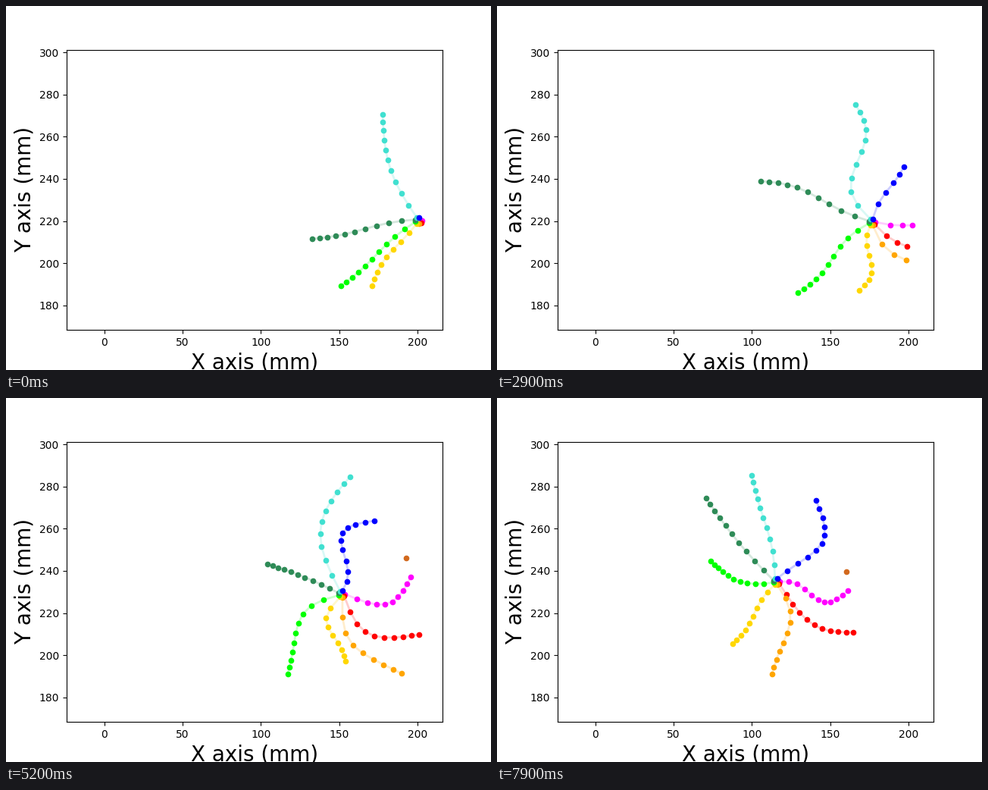
Write a matplotlib script that moves like this. It is 640 by 480 pixels and loops after 8000 ms.

```python
import numpy as np
import matplotlib.pyplot as plt
from matplotlib.animation import FuncAnimation

FRAMES, STEP = 80, 100          # frame count, ms per frame
TAPER = 0.35                    # joints crowd together towards the tip
RING, RING_STEP = 4.3, 40       # roots sit on a ring: radius px, degrees apart
SEEN_FROM = 3800                # first sight of the loose dot, ms

# Key times (ms) and body centre at each, in stage pixels
TIMES = np.array([0, 1600, 2900, 4600, 5800, 6700, 7900.])
HUB = np.array([(544.5, 283), (522, 287), (495, 285), (455, 268),
                (431, 251), (409, 250), (369, 242)])


def ease(t, p, s):
    """Smooth path through points p at times t, read at time s."""
    t, p = np.asarray(t, float), np.asarray(p, float)
    m = np.gradient(p, t, axis=0)
    k = int(np.clip(np.searchsorted(t, s, side="right") - 1, 0, len(t) - 2))
    h = t[k + 1] - t[k]
    u = (s - t[k]) / h
    v = 1 - u
    return ((1 + 2 * u) * v * v * p[k] + u * v * v * h * m[k]
            + u * u * (3 - 2 * u) * p[k + 1] - u * u * v * h * m[k + 1])


fig, ax = plt.subplots(figsize=(6.4, 4.8), dpi=100)
ax.set_xlim(-24, 216)
ax.set_ylim(168.303, 301.303)
ax.set_xlabel("X axis (mm)", fontsize=20)
ax.set_ylabel("Y axis (mm)", fontsize=20)


def to_mm(p):
    """Stage pixels, y down, to axis units."""
    p = np.atleast_2d(p)
    return ax.transData.inverted().transform(np.c_[p[:, 0], 480 - p[:, 1]]).T


def dot_plot(color):
    return ax.plot([], [], "o", color=color, ms=4.5, mew=1, zorder=3)[0]


class Arm:
    """A chord from root to tip, bent sideways by a bow and an S-shaped wave.

    Each pose is (tip x, tip y, bow, wave); the last pose falls on the last
    key time, and an arm with fewer poses holds its first one before that.
    """

    def __init__(self, color, ring, counts, *poses):
        angle = np.radians(ring * RING_STEP)
        self.root = RING * np.array([np.cos(angle), np.sin(angle)])
        self.counts = np.pad(counts, (0, len(TIMES) - len(counts)), "edge")
        full = np.array([pose + (0,) * (4 - len(pose)) for pose in poses])
        self.poses = np.pad(full, ((len(TIMES) - len(full), 0), (0, 0)), "edge")
        self.line = ax.plot([], [], color=color, lw=2, alpha=0.2, zorder=2)[0]
        self.dots = dot_plot(color)

    def joints(self, ms):
        x, y, bow, wave = ease(TIMES, self.poses, ms)
        n = np.interp(ms, TIMES, self.counts)
        u = np.arange(int(n + 1e-6) + 1) / max(n, 1)
        s = u + TAPER * u * (1 - u)
        root = ease(TIMES, HUB, ms) + self.root
        chord = np.array([x, y]) - root
        normal = np.array([-chord[1], chord[0]]) / np.hypot(*chord)
        side = bow * np.sin(np.pi * s) + wave * np.sin(2 * np.pi * s)
        return root + np.outer(s, chord) + np.outer(side, normal)

    def draw(self, ms):
        xy = to_mm(self.joints(ms))
        self.line.set_data(*xy)
        self.dots.set_data(*xy)


ARMS = [
    Arm("magenta", 0, [0, 1, 3, 9, 10],
        (544, 288), (548, 289, 2), (549, 242, 20), (521, 226, 33, -4),
        (505, 227, 27, -6), (463, 254, 13, -9)),
    Arm("red", 1, [0, 2, 3, 8, 10],
        (555, 307, 3), (541, 317, 4), (553, 317, 19, 3), (533, 307, 37),
        (508, 306, 34, -6), (470, 309, 20, -2)),
    Arm("orange", 2, [0, 2, 3, 8, 9],
        (540, 322, 2), (540, 335, 9), (544, 368, 16, 6), (499, 362, 35),
        (431, 362, 20, -14), (363, 364, -18, -5)),
    Arm("gold", 3, [8, 8, 8, 8, 9],
        (483, 369, 6, -2), (479, 375), (478, 375, -7, 7), (462, 362, 5, 10),
        (429, 341, 27, 3), (389, 338, 28, -8), (311, 324, 0, 3)),
    Arm("lime", 4, [10],
        (442, 369, 1, 2), (422, 382, 0, 2), (397, 378, 1, 5),
        (373, 371, 16, 6), (370, 350, 32, 3), (360, 307, 40, -9),
        (282, 215, -13)),
    Arm("seagreen", 5, [10],
        (404, 307, 0, 2), (362, 244, -19), (348, 231, 6, -4), (346, 219, 2),
        (339, 215, 1), (311, 186, -11, 2), (276, 132, -4)),
    Arm("turquoise", 6, [10],
        (497, 143, -13), (477, 140, -5, -11), (473, 130, -8, -15),
        (464, 100, -25, -3), (438, 114, -39, 5), (394, 142, -37, 10),
        (336, 102, 4, 2)),
    Arm("blue", 7, [0, 3, 5, 10],
        (548, 228), (537, 212, -3, -2), (519, 188, -40, 10),
        (451, 138, 0, 14), (418, 130, 30, 6), (421, 135, 30, -6)),
]

loose = dot_plot("chocolate")
LOOSE_TIMES = [SEEN_FROM, 4600, 5800, 6700, 7900]
LOOSE_PATH = [(553, 217), (538, 214), (516, 208), (493, 204), (461, 229)]


def draw(i):
    ms = i * STEP
    for arm in ARMS:
        arm.draw(ms)
    loose.set_data(*to_mm(ease(LOOSE_TIMES, LOOSE_PATH, max(ms, SEEN_FROM))))
    loose.set_visible(ms >= SEEN_FROM)
    return [a for arm in ARMS for a in (arm.line, arm.dots)] + [loose]


anim = FuncAnimation(fig, draw, frames=FRAMES, interval=STEP,
                     repeat=True, repeat_delay=0, blit=False)
plt.show()
```
